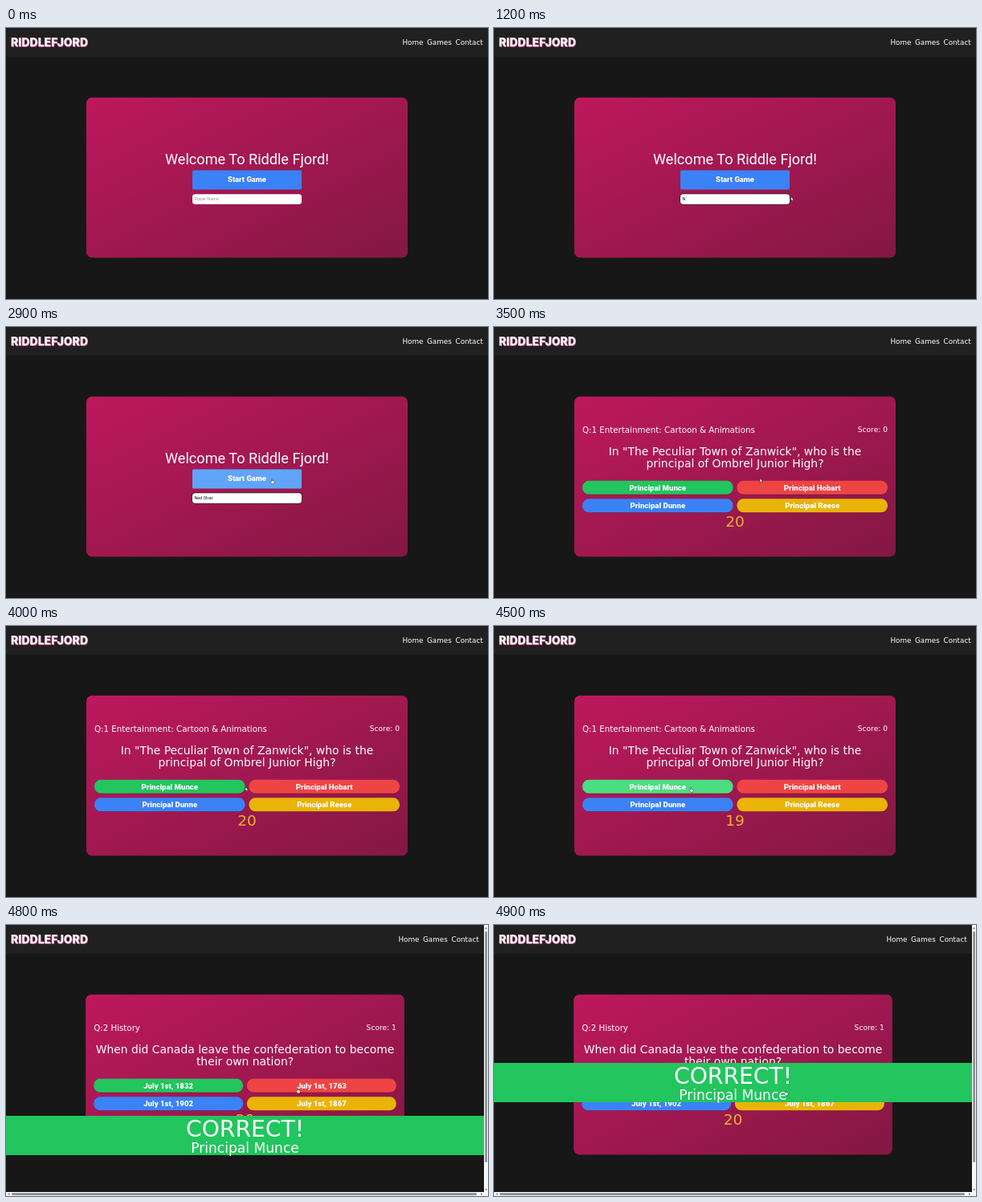
An HTML page for the animation above (5000 ms loop, 600 by 338 pixels).

```html
<!DOCTYPE html>
<html lang="en">
<head>
<meta charset="utf-8">
<title>Quiz game</title>
<style>
  html, body { margin: 0; width: 100%; height: 100%; overflow: hidden; background: #171717; }
  svg { display: block; width: 100%; height: 100%; }
  text { font-family: Roboto, "Open Sans", sans-serif; fill: #fff; white-space: pre; }
  .mid { text-anchor: middle; }
  .end { text-anchor: end; }
  .bold { font-weight: 800; }
  .wide { font-family: "DejaVu Sans", sans-serif; }
  .logo { font-family: Inter, sans-serif; font-weight: 900; fill: #fdf0f6; }
</style>
</head>
<body>
<svg id="stage" viewBox="0 0 600 338"></svg>
<script>
const LOOP = 5000, STEP = 100;
const GREEN = '#22c55e', RED = '#ef4444', BLUE = '#3b82f6', YELLOW = '#eab308';
const LIGHT = { [GREEN]: '#4ade80', [RED]: '#f87171', [BLUE]: '#60a5fa' };

const rect = (x, y, w, h, fill, r = 0, extra = '') =>
  `<rect x="${x}" y="${y}" width="${w}" height="${h}" rx="${r}" fill="${fill}" ${extra}/>`;
const text = (x, y, size, str, cls = '', extra = '') =>
  `<text x="${x}" y="${y}" font-size="${size}" class="${cls}" ${extra}>${str}</text>`;
const group = (id, body) => `<g id="${id}">${body}</g>`;

function answer(id, x, y, w, color, label) {
  return rect(x, y + 0.8, w, 17, '#000', 8, 'opacity=".22"') +
    rect(x, y, w, 17, color, 8, `id="${id}" data-color="${color}"`) +
    text(x + w / 2, y + 12, 9.6, label, 'mid bold');
}

function page(id, width, body) {
  const x = width / 6, w = width * 2 / 3;
  const nav = [['Home', 106.5], ['Games', 76], ['Contact', 40.5]]
    .map(([label, right]) => text(width - right, 20.7, 8.8, label, 'wide')).join('');
  return group(id, nav + rect(x, 86.8, w, 199.6, 'url(#card)', 7) + body);
}

function quiz(id, width, q) {
  const left = width / 6 + 10, mid = width / 2, right = width - left;
  const w = mid - left - 2.4;
  const colors = [GREEN, RED, BLUE, YELLOW];
  const answers = q.answers.map((label, i) =>
    answer(id + i, i % 2 ? mid + 2.4 : left, i < 2 ? 191.8 : 214.3, w, colors[i], label)).join('');
  return page(id, width,
    text(left, 132, 10.26, q.topic, 'wide') +
    text(right, 131.2, 9.1, 'Score: ' + q.score, 'wide end') +
    q.lines.map((line, i) => text(mid, 160 + i * 15, 13.9, line, 'wide mid')).join('') +
    answers +
    text(mid, 248.5, 18.5, '20', 'wide mid', `id="${id}Timer" style="fill:#ecb22e"`));
}

function scrollbars() {
  const bar = '#8a8a8a';
  return rect(595, 0, 5, 338, '#f7f7f7') + rect(0, 333, 600, 5, '#f7f7f7') +
    rect(596.3, 8, 2.6, 288, bar, 1.3) + rect(7, 334.3, 579, 2.6, bar, 1.3) +
    `<path fill="${bar}" d="M596 5l1.6-2.4 1.6 2.4zM596 329l1.6 2.4 1.6-2.4z
      M4.5 334v3.2l-2.4-1.6zM591 334v3.2l2.4-1.6z"/>`;
}

const stage = document.getElementById('stage');
stage.innerHTML = `
  <defs>
    <linearGradient id="card" x1="0" y1="0" x2="1" y2="1">
      <stop stop-color="#be185d"/><stop offset="1" stop-color="#831843"/>
    </linearGradient>
  </defs>` +
  rect(0, 0, 600, 338, '#171717') + rect(0, 0, 600, 35.5, '#202020') +
  text(6.6, 23.6, 14, 'RIDDLEFJORD', 'logo', 'style="fill:#be3c78"') +
  text(6, 23, 14, 'RIDDLEFJORD', 'logo') +
  page('welcome', 600,
    text(300, 169.5, 18.1, 'Welcome To Riddle Fjord!', 'mid') +
    rect(232, 177.5, 136, 24, BLUE, 1.5, `id="start" data-color="${BLUE}"`) +
    text(300, 192.3, 9.4, 'Start Game', 'mid bold') +
    rect(231.3, 206.5, 137.4, 14, '#30282c', 4, 'id="ring"') +
    rect(232, 207.2, 136, 12.6, '#fff', 3.5) +
    text(234.5, 215.2, 5.3, '', '', 'id="field"') +
    rect(257.3, 210.5, 0.6, 6, '#222', 0, 'id="caret"')) +
  quiz('first', 600, {
    topic: 'Q:1 Entertainment: Cartoon &amp; Animations', score: 0,
    lines: ['In "The Peculiar Town of Zanwick", who is the', 'principal of Ombrel Junior High?'],
    answers: ['Principal Munce', 'Principal Hobart', 'Principal Dunne', 'Principal Reese']
  }) +
  quiz('second', 595, {
    topic: 'Q:2 History', score: 1,
    lines: ['When did Canada leave the confederation to become', 'their own nation?'],
    answers: ['July 1st, 1832', 'July 1st, 1763', 'July 1st, 1902', 'July 1st, 1867']
  }) +
  group('banner', rect(0, 0, 595, 49, GREEN) +
    text(297.5, 26.3, 28.2, 'CORRECT!', 'wide mid') +
    text(297.5, 46.3, 17.1, 'Principal Munce', 'wide mid')) +
  group('bars', scrollbars()) +
  `<path id="arrow" d="M0 0v4.8l1.2-1 .8 1.7.8-.4-.7-1.6h1.5z" fill="#fff" stroke="#222" stroke-width=".5"/>
   <path id="hand" d="M1.5 3.8V.8q.6-.8 1.1 0v2l2 .5q.7.3.5 1.1l-.5 2.4H2L.2 4.3q.3-.8 1.3-.5z"
     fill="#fff" stroke="#222" stroke-width=".5"/>`;

const $ = id => document.getElementById(id);
const show = (id, on) => $(id).setAttribute('visibility', on ? 'visible' : 'hidden');
const move = (id, x, y) => $(id).setAttribute('transform', `translate(${x} ${y})`);

// Each row holds from its time until the next one.
const SCENES = [[0, 'welcome'], [3400, 'first'], [4600, 'second']];
const TYPED = [[0, 0], [1200, 1], [1400, 2], [1600, 3], [1700, 4], [1800, 5], [2000, 6], [2100, 7], [2200, 9]];
const HOVER = [[0, ''], [2800, 'start'], [3400, ''], [3700, 'first1'], [4000, ''], [4100, 'first0']];
const BANNER = [[0, 338], [4700, 303], [4800, 238], [4900, 172]];
const CURSOR = [
  [0, 'none', 0, 0], [700, 'arrow', 352, 213], [800, 'arrow', 362, 212], [900, 'arrow', 369.5, 210.5],
  [2400, 'arrow', 369.5, 212], [2700, 'arrow', 358, 205], [2800, 'hand', 340, 194], [2900, 'hand', 329, 189],
  [3400, 'arrow', 331, 189], [3700, 'hand', 328, 194], [3900, 'hand', 318, 199], [4000, 'arrow', 298, 201],
  [4100, 'hand', 272, 202], [4200, 'hand', 252, 201], [4300, 'hand', 243, 200.5],
  [4600, 'hand', 310, 202], [4700, 'hand', 361, 203], [4900, 'hand', 361, 206]
];
const at = (table, t) => table.findLast(row => row[0] <= t);
const hoverable = ['start', 'first0', 'first1'];

function draw(t) {
  const scene = at(SCENES, t)[1], last = scene === 'second';
  for (const [, name] of SCENES) $(name).style.display = name === scene ? '' : 'none';

  const typed = at(TYPED, t)[1], field = $('field');
  field.textContent = typed ? 'Ned Olvar'.slice(0, typed) : 'Player Name';
  field.style.fill = typed ? '#111' : '#9298a3';
  $('ring').style.opacity = t >= 800 ? 1 : 0;
  $('caret').style.opacity = t >= 3200 ? 1 : 0;

  const hovered = at(HOVER, t)[1];
  for (const id of hoverable) {
    const el = $(id), color = el.dataset.color;
    el.setAttribute('fill', id === hovered ? LIGHT[color] : color);
  }
  $('firstTimer').textContent = t < 4300 ? 20 : 19;

  show('bars', last);
  show('banner', last);
  move('banner', 0, at(BANNER, t)[1]);

  const [, kind, x, y] = at(CURSOR, t);
  for (const id of ['arrow', 'hand']) {
    show(id, id === kind);
    move(id, x, y);
  }
}

const began = performance.now();
function tick() {
  const t = (performance.now() - began) % LOOP;
  draw(Math.floor(t / STEP) * STEP);
  requestAnimationFrame(tick);
}
tick();
</script>
</body>
</html>
```
